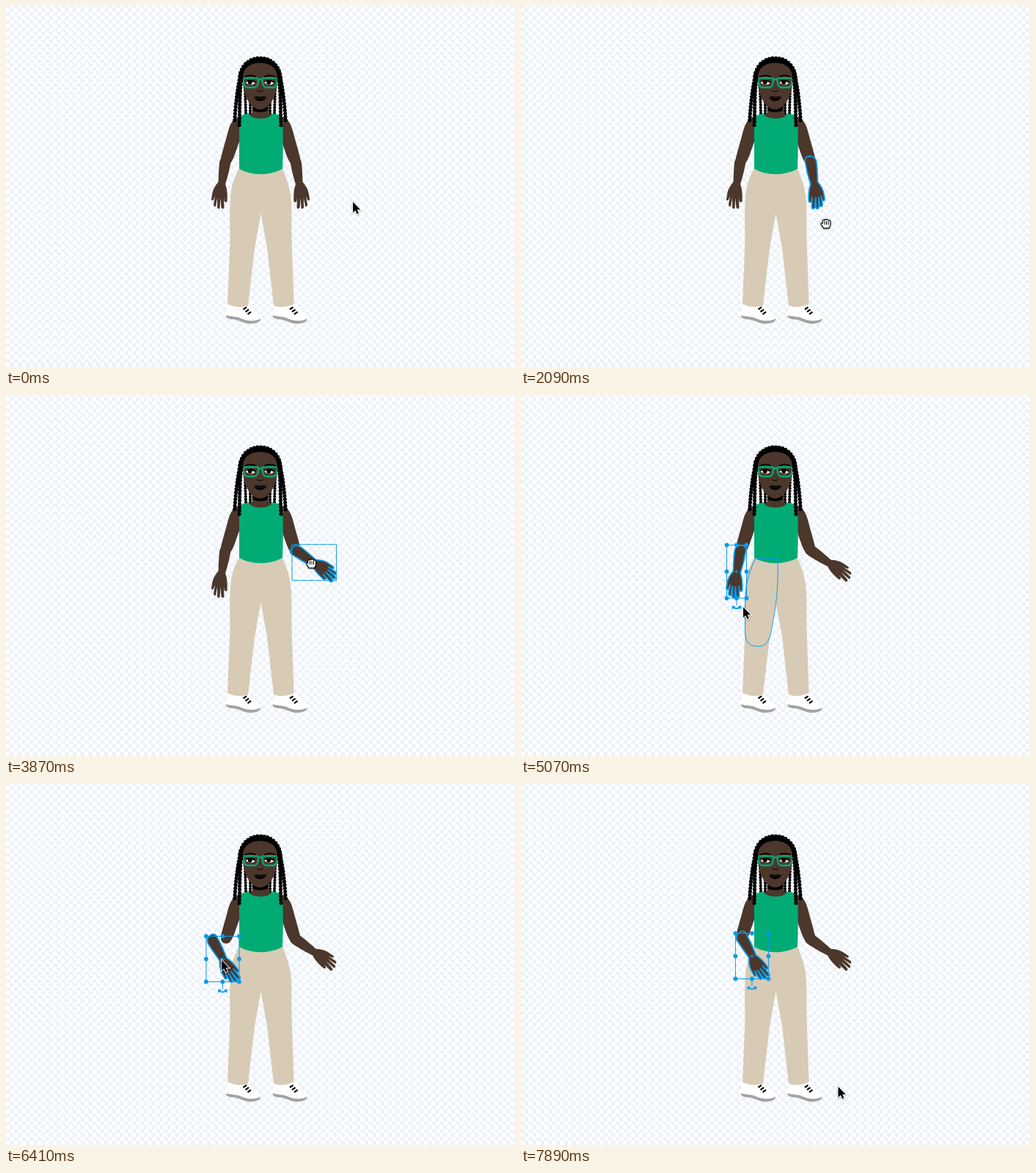
Animation, 694 px wide and 492 px high, one loop 8000 ms. Source, as an HTML page:

```html
<!DOCTYPE html>
<html lang="en">
<head>
<meta charset="utf-8">
<title>Posing a figure</title>
<style>
  html, body { margin: 0; width: 100%; height: 100%; overflow: hidden; }
  body { background: repeating-conic-gradient(#edf2f9 0 25%, #fff 0 50%) -.3px 2.4px / 10.75px 10.75px; }
  svg { display: block; width: 694px; height: 492px; }
  .skin { fill: #4b372b; }
  .hair { fill: none; stroke: #000; stroke-linecap: round; stroke-width: 5.2; stroke-dasharray: 0 4.6; }
  .thin { stroke-width: 4.2; stroke-dasharray: 0 3.8; }
  .pants { fill: #d7cbb6; }
  .green { fill: #02ab74; }
  .rim { fill: none; stroke: #08a672; stroke-width: 2.4; stroke-linejoin: round; }
  .line { fill: none; stroke: #0c9ae8; stroke-width: 1; }
  .dot { fill: #0c9ae8; }
  .arm { stroke: #0c9ae8; stroke-width: 0; stroke-linejoin: round; }
  #arrow, #fist { filter: drop-shadow(0 1px 1px rgba(0, 0, 0, .3)); }
</style>
</head>
<body>
<svg viewBox="0 0 694 492">
  <defs>
    <path id="upper" d="M376 151C383 152 388 159 391 170C394 182 398 194 401 207C402 214 398 218 393 217.5C388 217 386 211 383 205L376 185Z"/>
    <path id="fore" d="M387.5 212C386.5 206 391 204.5 395 204.8C400 205.2 402.5 209 403 214C404 224 404.3 233 404.5 240C408 244 412 250 412.8 256L414 263.5Q413.5 266.5 411.2 264.5L409 259L411 270.5Q410.5 274.5 408 273L405.8 261L406 274.5Q404.5 278 402.5 275.5L401.6 261.5L400.6 274.5Q398.5 278 396.6 275L396.8 260.5L396.2 266Q394 269 392.4 266C392 256 392.5 249 395 243C392 234 389 222 387.5 212Z"/>
    <g id="shoe">
      <path fill="#fff" d="M302 406L330 408L334 412C337 418 347 420 347.3 426C347 430 338 431 331 430C320 428 316 424 300 423Z"/>
      <path fill="#a3a3a3" d="M300 421.5C308 424 315 422.5 321 426C329 430 341 430 347.3 426C347 431 340 433 333 433C322 433 318 426.5 307 427Q300 426 300 421.5Z"/>
      <path stroke="#000" stroke-width="2.2" d="M323.5 413.5l4.5-3.2M326.5 416.8l4.5-3.2M329.5 420.1l4.5-3.2"/>
    </g>
    <path id="backBraids" class="hair thin" d="M326 112L327 147M333 120V148"/>
    <path id="braids" class="hair" d="M320 92C315 115 313 135 311.5 160M321 98C318 122 319 142 318 164"/>
    <g id="eye">
      <path fill="#fff" d="M326.5 104.5Q333 98.5 340.5 104.5Q334 110 326.5 104.5Z"/>
      <path d="M326 104Q333 97.5 341 103.5L340 105Q333 100.5 326 104Z"/>
      <circle cx="332.7" cy="104" r="3"/>
    </g>
  </defs>

  <use href="#backBraids"/>
  <use href="#backBraids" transform="translate(693) scale(-1 1)"/>
  <use href="#upper" class="skin"/>
  <use href="#upper" class="skin" transform="translate(694) scale(-1 1)"/>
  <use href="#shoe"/>
  <use href="#shoe" x="63.5"/>
  <path class="pants" d="M319 220C310 234 307 247 306 262C304 285 306 310 305 332L302 406Q316 413 330 408.5L339 330L347.5 283L356 330L365 408.5Q378 413 392.5 406L390 332C389 305 390 285 389 268C388 250 384 238 376 220Z"/>
  <path class="skin" d="M335.5 128H358V146L366 149Q347 160 328 149L335.5 146Z"/>
  <path class="green" d="M318 151Q324 147 330 146.5Q335 153.5 347 153.5Q359 153.5 363.5 146.5Q371 147 377 151Q378.5 185 377 222Q364 229 347.5 229.3Q330 229 318 222Z"/>
  <path d="M336 136H357.5L356 143Q347 146.500 337 143Z"/>
  <path d="M319 104C318 88 327 71 346.5 71C366 71 375 88 374 104Z"/>
  <path class="hair" d="M319 100C318 86 328 71 346.5 71C365 71 375 86 374 100"/>
  <path class="skin" d="M323 100C322 86 331 77.5 346.5 77.5C362 77.5 371 86 370 100C371 118 361 141 346.5 141C332 141 322 118 323 100Z"/>
  <path fill="none" stroke="#000" stroke-width="1.8" d="M325 97Q332 92.5 341 96.5M352 96.5Q361 92.5 368 97"/>
  <use href="#eye"/>
  <use href="#eye" x="25.5"/>
  <path class="rim" d="M323.3 98.3H342Q344.500 98.300 344 101Q343.500 111 339 111H329Q324 111 323.3 98.3ZM370 98.300H351.500Q349 98.300 349.500 101Q350 111 354.500 111H364.500Q369.500 111 370 98.300ZM344.500 100.500Q347 99 349 100.500"/>
  <path d="M341.500 114.500Q346.500 118 351.500 114.500Q350 117.500 346.500 117Q343 117.500 341.500 114.500Z"/>
  <path d="M338 124.500Q342 122.500 346.500 124Q351 122.500 355.500 124Q352 129.500 346.500 129.500Q341 129.500 338 124.500Z"/>
  <path fill="none" stroke="#4b372b" stroke-width=".6" d="M339 125Q346 127 354 124.500"/>
  <use href="#braids"/>
  <use href="#braids" transform="translate(693) scale(-1 1)"/>

  <g id="right"><use href="#fore" class="skin arm"/></g>
  <g id="left"><use href="#fore" class="skin arm" transform="translate(694) scale(-1 1)"/></g>

  <path id="thigh" class="line" d="M320 222.500H350C351 255 349 280 344 306C341 322 340 333 334 339C329 344 316 344 310 338C305 333 305.500 322 305.500 310C306 280 303 255 320 222.500Z"/>
  <rect id="box" class="line"/>
  <g id="handles"></g>
  <path id="arrow" stroke="#fff" stroke-width="1.8" paint-order="stroke" d="M0 0V14.500L3.300 11.400L5.600 16.500L7.900 15.500L5.700 10.500H10.200Z"/>
  <g id="fist" stroke="#000" stroke-linecap="round" stroke-linejoin="round">
    <path fill="#fff" stroke-width="1.200" d="M-4.300 0V-3.500Q-3.500-6-1.800-4.500Q-.7-7 .9-5Q2.500-6.800 3.800-4.300Q6.300-5 6.500-2.300V1Q6 4 4.500 6.300H-3Q-4.300 3.500-6.300 1.300Q-7.300-1.500-4.300-.5Z"/>
    <path fill="none" d="M-1.500-3v4.200M1-3v4.200M3.500-3v4.200"/>
  </g>
</svg>
<script>
  const LOOP = 8000, TICK = 148.9;
  const $ = id => document.getElementById(id);

  // Pivot of each forearm, its frame size at rest and posed, and its drift while turning.
  const arms = {
    right: { cx: 400.2, cy: 240.7, rest: [27.5, 72.5], posed: [60.5, 49], drift: [-2, 1.6] },
    left: { cx: 294, cy: 240.7, rest: [27, 72.5], posed: [45, 62], drift: [1.4, -2.2] }
  };

  const progress = (k, a, b) => Math.min(1, Math.max(0, (k - a) / (b - a)));
  const smooth = f => f * f * (3 - 2 * f);
  const easeOut = f => 1 - (1 - f) ** 3;

  const glide = (a, b, x, y) => (s, k) => {
    const f = smooth(progress(k, a, b));
    s.x += (x - s.x) * f;
    s.y += (y - s.y) * f;
  };
  // The pointer circles the pivot together with the forearm.
  const turn = (name, a, b, degrees) => (s, k) => {
    const { cx, cy } = arms[name], f = smooth(progress(k, a, b));
    const r = -degrees * f * Math.PI / 180, x = s.x - cx, y = s.y - cy;
    s.x = cx + x * Math.cos(r) - y * Math.sin(r);
    s.y = cy + x * Math.sin(r) + y * Math.cos(r);
    s[name].angle = degrees * f;
    s[name].part = f;
    if (k >= a && k <= b) s.turning = s.fist = true;
  };
  const drag = (name, a, b, release, dx, dy) => (s, k) => {
    const f = easeOut(progress(k, a, b));
    s.x += s[name].dx = dx * f;
    s.y += s[name].dy = dy * f;
    if (k > a && k < release) s.fist = true;
  };

  const script = [
    glide(3, 6, 402, 238),
    glide(8, 11, 408, 292),
    glide(13, 14, 415.5, 292),
    turn('right', 14, 18, 46.5),
    glide(18, 20, 394, 239),
    drag('right', 20, 22, 28, 22, -14),
    glide(27, 31, 300, 237),
    glide(32, 34, 303, 289),
    turn('left', 35, 39, 38),
    glide(39, 42, 294, 240),
    drag('left', 43, 48, 51, 19.5, -4),
    glide(50, 53, 432.5, 412.5)
  ];

  const show = (el, on) => { el.style.display = on ? '' : 'none'; };
  const move = (el, x, y) => el.setAttribute('transform', `translate(${x} ${y})`);

  function drawFrame(mx, my, [w, h]) {
    const x = mx - w / 2, y = my - h / 2, b = y + h;
    const rect = { x, y, width: w, height: h };
    for (const key in rect) $('box').setAttribute(key, rect[key]);
    let out = `<path class="line" d="M${mx} ${b}v10M${mx - 3} ${my}h6M${mx} ${my - 3}v6"/>
      <path class="line" style="stroke-width:2" d="M${mx - 4.5} ${b + 12.5}q4.5 3 9 0"/>
      <path class="dot" d="M${mx - 6.5} ${b + 10.5}h5l-4.5 5zM${mx + 6.5} ${b + 10.5}h-5l4.5 5z"/>`;
    for (const i of [-1, 0, 1])
      for (const j of [-1, 0, 1])
        if (i || j) out += `<circle class="dot" cx="${mx + i * w / 2}" cy="${my + j * h / 2}" r="2.9"/>`;
    $('handles').innerHTML = out;
  }

  function render(k) {
    const rest = () => ({ angle: 0, part: 0, dx: 0, dy: 0 });
    const s = { x: 473, y: 267, right: rest(), left: rest() };
    for (const step of script) step(s, k);

    const selected = k < 8 ? '' : k < 32 ? 'right' : 'left';
    const hovered = k === 6 || k === 7 ? 'right' : k === 31 ? 'left' : '';
    for (const name in arms) {
      const { cx, cy, rest, posed, drift } = arms[name], { angle, part, dx, dy } = s[name];
      const x = drift[0] * part + dx, y = drift[1] * part + dy;
      $(name).setAttribute('transform', `translate(${x} ${y}) rotate(${-angle} ${cx} ${cy})`);
      $(name).firstChild.style.strokeWidth = name === selected ? 1.8 : name === hovered ? 1 : 0;
      if (name === selected) drawFrame(cx + x, cy + y, part ? posed : rest);
    }
    show($('box'), selected && !s.turning);
    show($('handles'), selected && !s.fist);
    show($('thigh'), k === 30 || k === 34);
    show($('arrow'), !s.fist);
    show($('fist'), s.fist);
    move($('arrow'), s.x, s.y);
    move($('fist'), s.x, s.y + 4.5);
  }

  // The pose advances in even ticks, like a screen recording.
  let last = -1;
  function loop() {
    const k = Math.floor((performance.now() % LOOP + 2) / TICK);
    if (k !== last) render(last = k);
    requestAnimationFrame(loop);
  }
  loop();
</script>
</body>
</html>
```
